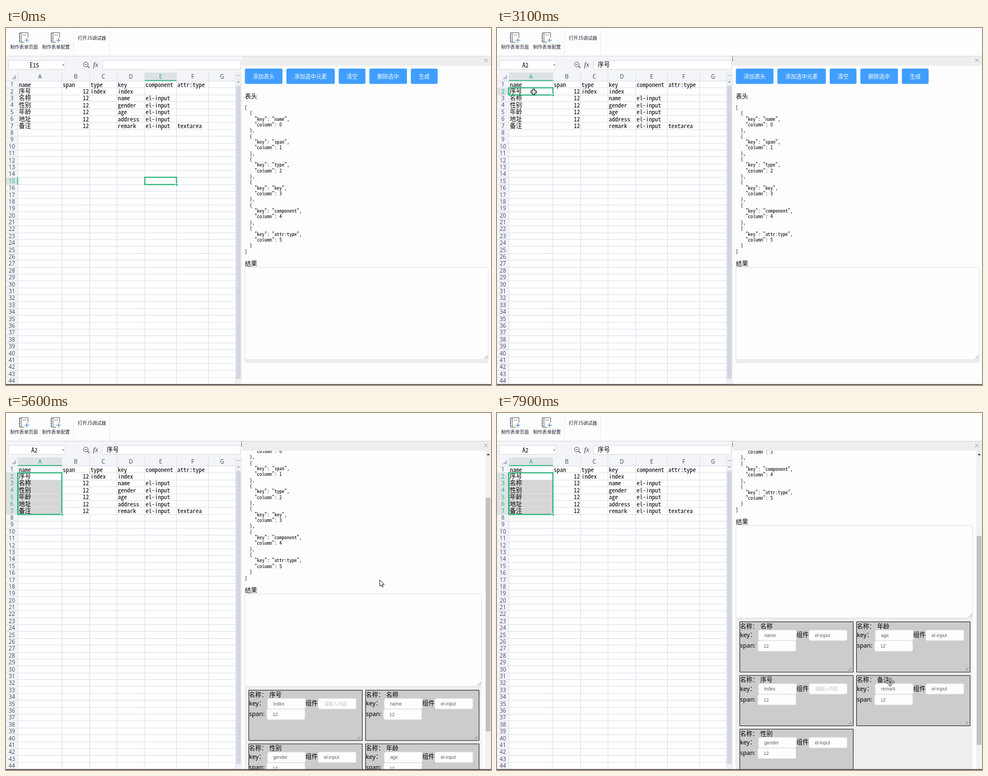
Recreate the animation shown at these times as an HTML page with a canvas. Size 872 by 642 pixels, loop 8 s.

```html
<!DOCTYPE html>
<html lang="zh">
<head>
<meta charset="utf-8">
<style>
html, body { margin: 0; width: 100%; height: 100%; overflow: hidden; background: #fdfdfd; }
canvas { display: block; }
</style>
</head>
<body>
<canvas id="stage" width="872" height="642"></canvas>
<script>
const ctx = document.getElementById('stage').getContext('2d');
const SANS = '"Noto Sans", "Noto Sans CJK SC", sans-serif';
const CJK = '"Noto Sans CJK SC", "Noto Sans", sans-serif';
const MONO = '"Noto Sans Mono CJK SC", "Liberation Mono", monospace';
const ARIAL = '"Liberation Sans", "Noto Sans CJK SC", sans-serif';
const SERIF = '"Liberation Serif", serif';
const GREEN = '#21b072', BLUE = '#409eff', HOVER = '#66b1ff', PRESS = '#3a8ee6';

ctx.font = `100px ${MONO}`;
const MONO_WIDTH = ctx.measureText('0').width / 100;

const COLS = [21.5, 100.5, 150.5, 199.5, 249.5, 306.5, 364.5, 412.5];
const ROWS = [
  ['name', 'span', 'type', 'key', 'component', 'attr:type'],
  ['序号', '12', 'index', 'index'],
  ['名称', '12', '', 'name', 'el-input'],
  ['性别', '12', '', 'gender', 'el-input'],
  ['年龄', '12', '', 'age', 'el-input'],
  ['地址', '12', '', 'address', 'el-input'],
  ['备注', '12', '', 'remark', 'el-input', 'textarea']
];
const JSON_LINES = JSON.stringify(
  ROWS[0].map((key, column) => ({ key, column })), null, 2).split('\n');

let nextX = 429.5;
const BUTTONS = ['添加表头', '添加选中元素', '清空', '删除选中', '生成'].map(label => {
  const x = nextX, w = 28.6 + 9.75 * label.length;
  nextX += w + 7;
  return { label, x, w };
});

// Pointer moves: from time, to time, x, y
const MOVES = [
  [0, 100, 843, 139], [100, 450, 430, 45], [450, 900, 88, 101], [900, 1000, 62, 103],
  [1000, 1570, 360, 104], [1800, 2200, 463, 87], [2500, 3000, 66, 115],
  [3100, 3500, 66, 176], [3700, 4300, 608, 108], [4300, 4500, 552, 86],
  [4900, 5300, 672, 300], [6000, 6500, 739, 442], [6600, 7150, 524, 437],
  [7400, 7900, 707, 484]
];

const clamp = p => Math.min(1, Math.max(0, p));
const mix = (a, b, p) => a + (b - a) * p;
const easeOut = (start, t) => 1 - (1 - clamp((t - start) / 200)) ** 3;
const rowY = r => 96 + 12.39 * r;
const rowLine = r => Math.round(rowY(r)) - 0.5;

function ramp(from, to, t) {
  const p = clamp((t - from) / (to - from));
  return p * p * (3 - 2 * p);
}

function cursorAt(t) {
  let x = 0, y = 0;
  for (const [from, to, toX, toY] of MOVES) {
    const p = ramp(from, to, t);
    x = mix(x, toX, p);
    y = mix(y, toY, p);
  }
  return [x, y];
}

// The selected range trails the dragging pointer
function selection(t) {
  if (t < 1000) return [4, 14, 4, 14];
  const [press, row] = t < 3000 ? [1000, 0] : [3000, 1];
  const [x, y] = cursorAt(Math.min(press + 700, Math.max(press, t - 200)));
  return [0, row, COLS.findIndex(c => c > x) - 1, Math.floor((y - rowY(0)) / 12.39)];
}

function box(x, y, w, h, fill, stroke, r = 0, width = 1) {
  ctx.beginPath();
  ctx.roundRect(x, y, w, h, r);
  if (fill) { ctx.fillStyle = fill; ctx.fill(); }
  if (stroke) { ctx.strokeStyle = stroke; ctx.lineWidth = width; ctx.stroke(); }
}

function line(x1, y1, x2, y2, color, width = 1) {
  ctx.beginPath();
  ctx.moveTo(x1, y1);
  ctx.lineTo(x2, y2);
  ctx.strokeStyle = color;
  ctx.lineWidth = width;
  ctx.stroke();
}

function poly(points, fill, stroke) {
  ctx.beginPath();
  points.forEach(([x, y]) => ctx.lineTo(x, y));
  ctx.closePath();
  ctx.fillStyle = fill;
  ctx.fill();
  if (stroke) { ctx.strokeStyle = stroke; ctx.lineWidth = 1; ctx.stroke(); }
}

function triangle(x, y, w, h, color) {
  poly([[x - w / 2, y], [x + w / 2, y], [x, y + h]], color);
}

function text(s, x, y, size, font, color = '#000', align = 'left', style = '') {
  ctx.font = `${style} ${size}px ${font}`;
  ctx.fillStyle = color;
  ctx.textAlign = align;
  ctx.fillText(s, x, y);
}

function mono(s, x, y, advance, align) {
  if (s > '\u2fff') text(s, x, y, 2 * advance, CJK, '#000', align);
  else text(s, x, y, advance / MONO_WIDTH, MONO, '#000', align);
}

function grip(x, y) {
  for (const d of [3, 6]) line(x - d, y, x, y - d, '#777', 0.8);
}

function notebook(x) {
  box(x + 0.5, 8.5, 15, 17, '#fff', '#666');
  line(x + 3.5, 9, x + 3.5, 25, '#666');
  line(x + 6, 12.5, x + 13, 12.5, '#888');
  for (let y = 11; y < 25; y += 4) line(x - 1, y, x + 2, y, '#666');
  box(x + 9, 17, 9, 10, '#fdfdfd');
  line(x + 13.5, 18, x + 13.5, 26, '#4a90e2', 1.2);
  line(x + 9.5, 22, x + 17.5, 22, '#4a90e2', 1.2);
}

function toolbar() {
  box(0, 0, 872, 50, '#fdfdfd');
  ['制作表单页面', '制作表单配置', '打开JS调试器'].forEach((label, i) => {
    if (i < 2) notebook(24 + 57 * i);
    text(label, [7.5, 65, 129][i], i < 2 ? 37 : 20.5, 8.3, CJK, '#223');
  });
  for (const x of [121.5, 186.5]) line(x, 4, x, 47, '#ececec');
  line(0, 50.5, 872, 50.5, '#d9d9d9');
}

function formulaBar([col, row]) {
  box(0, 51, 423, 29, '#f4f5f8');
  box(4.5, 58.5, 102, 16, '#fff', '#d9dce2');
  box(173.5, 58.5, 248, 16, '#fff', '#d9dce2');
  mono('ABCDEFG'[col] + (row + 1), 51, 70.5, 5.5, 'center');
  triangle(103, 65.5, 4, 2.5, '#777');
  box(139.3, 61.3, 8.4, 8.4, null, '#556', 4.2);
  line(146.5, 68.5, 150, 72, '#556', 1.4);
  line(141.5, 65.5, 145.5, 65.5, '#556');
  text('fx', 156.5, 70, 13, SERIF, '#445', 'left', 'italic');
  mono(ROWS[row]?.[col] || '', 181, 69.5, 5.5);
}

function sheet([c0, r0, c1, r1]) {
  box(0, 80, 413, 562, '#fff');
  box(0, 80, 413, 15, '#f3f5f9');
  box(0, 95, 21, 547, '#f3f5f9');
  poly([[18, 84], [18, 92], [10, 92]], '#b9bec8');

  const x = COLS[c0], y = rowLine(r0), w = COLS[c1 + 1] - x, h = rowLine(r1 + 1) - y;
  if (c1 > c0 || r1 > r0) {
    box(x, y, w, h, '#d6d6d6');
    box(x, y, COLS[c0 + 1] - x, rowLine(r0 + 1) - y, '#fff');
  }
  box(x, 80, w, 15, '#dde3e5');
  box(0, y, 21, h, '#dde3e5');

  for (const cx of COLS) line(cx, 80, cx, 642, '#dbe0ec');
  for (let r = 0; r < 45; r++) line(0, rowLine(r), 412, rowLine(r), '#dbe0ec');
  const label = (s, lx, ly, on) =>
    text(s, lx, ly, 10, SANS, on ? GREEN : '#4a5260', 'center');
  for (let c = 0; c < 7; c++) {
    label('ABCDEFG'[c], (COLS[c] + COLS[c + 1]) / 2, 91, c >= c0 && c <= c1);
  }
  for (let r = 0; r < 44; r++) label(r + 1, 10.5, rowY(r) + 9.3, r >= r0 && r <= r1);

  ROWS.forEach((row, r) => row.forEach((s, c) => {
    const right = c === 1 && r > 0;
    mono(s, right ? COLS[2] - 1.5 : COLS[c] + 1.5, rowY(r) + 9.7, 5.5, right ? 'right' : 'left');
  }));

  line(x, 94.5, x + w, 94.5, GREEN, 1.5);
  line(21, y, 21, y + h, GREEN, 1.5);
  box(x, y, w, h, null, GREEN, 0, 2);
  box(x + w - 1.5, y + h - 1.5, 4, 4, GREEN, '#fff');

  box(413, 80, 11, 562, '#eef0f4');
  line(415, 85.5, 422, 85.5, '#b5b9c2');
  triangle(418, 98, 5, -3, '#9aa0ab');
  box(414, 104, 8, 527, '#d3d7de', null, 2);
}

function field(s, x, y) {
  box(x, y, 68.5, 19, '#fdfdfd', '#dcdfe6', 2.7);
  text(s || '请输入内容', x + 10.5, y + 12.6, 8.3, ARIAL, s ? '#606266' : '#c0c4cc');
}

function card([name, span, , key, component], x, y) {
  box(x, y, 204, 90.5, '#ccc', '#222');
  text('名称：', x + 0.5, y + 12.3, 11, CJK);
  text(name, x + 37, y + 12.3, 11, CJK);
  text('key：', x + 0.5, y + 27.5, 11, SANS);
  field(key, x + 33.5, y + 14.7);
  text('组件', x + 102, y + 27.5, 11, CJK);
  field(component, x + 124.5, y + 14.7);
  text('span:', x + 0.5, y + 46.5, 11, SANS);
  field(span, x + 32.5, y + 34);
  grip(x + 201, y + 88);
}

function cards(t, scroll) {
  const down = easeOut(6800, t), up = easeOut(7200, t);
  const left = 436.5, right = 646.5;
  const slotY = r => 603.5 + 96.5 * r - scroll;
  ROWS.slice(1).forEach((row, i) => {
    if (i === 1) return;
    if (i % 2) card(row, right, slotY((i >> 1) - up));
    else card(row, left, slotY((i >> 1) + down));
  });

  // The dragged card trails the pointer, then settles in its new slot
  let x = right, y = slotY(0);
  if (t >= 6600) {
    const [grabX, grabY] = cursorAt(6600), [cx, cy] = cursorAt(Math.min(t, 7400) - 50);
    const settle = easeOut(7400, t);
    x = mix(x + cx - grabX, left, settle);
    y = mix(y + cy - grabY, y, settle);
    const step = 17.5, snapped = left + Math.max(0, Math.round((x - left) / step)) * step;
    if (t <= 7400) box(snapped, slotY(0), 204, 90.5, 'rgba(255,0,0,.2)');
  }
  card(ROWS[2], x, y);
}

function buttonColor(i, t) {
  if (i === 0 && t >= 2100 && t < 2700) return t >= 2400 && t < 2600 ? PRESS : HOVER;
  if (i === 1 && t >= 4500) return t >= 4700 && t < 4900 ? PRESS : HOVER;
  return BLUE;
}

function panel(t) {
  const filled = t >= 4900, scroll = 228 * ramp(5240, 6000, t);
  const right = filled ? 855 : 867;
  box(424, 51, 448, 17, '#eee');
  line(859.5, 55, 866, 61.5, '#999');
  line(866, 55, 859.5, 61.5, '#999');

  ctx.save();
  ctx.beginPath();
  ctx.rect(424, 68, 448, 574);
  ctx.clip();
  box(424, 68, 448, 574, '#fdfdfd');
  ctx.translate(0, -scroll);
  BUTTONS.forEach(({ label, x, w }, i) => {
    box(x, 73, w, 27.5, buttonColor(i, t), null, 2.5);
    text(label, x + w / 2, 90.6, 9.75, CJK, '#fff', 'center');
  });
  text('表头', 429.5, 126.8, 11, CJK);
  JSON_LINES.forEach((s, i) => mono(s, 429, 145.8 + 10.35 * i, 4.47));
  text('结果', 429.5, 427.8, 11, CJK);
  box(429, 596, right - 429, filled ? 400 : 7, '#eee');
  box(429.5, 430.5, right - 429.5, 166, '#fefefe', '#dcdfe6', 2.7);
  grip(right - 1, 595);
  ctx.translate(0, scroll);

  if (filled) {
    cards(t, scroll);
    const ratio = t < 6800 ? 0.696 : 0.622;
    box(861.5, 68, 10.5, 574, '#f1f1f1');
    triangle(867, 76, 6, -3.5, '#505050');
    box(862.5, 79.2 + scroll * ratio, 8.5, 604 * ratio, '#c1c1c1');
  }
  ctx.restore();
}

function spin(draw) {
  for (let i = 0; i < 4; i++) {
    draw();
    ctx.rotate(Math.PI / 2);
  }
}

const POINTERS = {
  arrow() {
    poly([[0, 0], [0, 11.5], [2.6, 9], [4.5, 13], [6.3, 12.2], [4.5, 8.3], [8, 8.3]], '#fff', '#222');
  },
  plus() {
    spin(() => line(0, 0, 0, 5.5, '#000', 4.6));
    spin(() => line(0, 0, 0, 4.5, '#fff', 2.4));
  },
  hand() {
    box(-4, 5, 10, 8.5, '#fff', '#222', 3);
    box(-1.5, 0, 2.6, 9, '#fff', '#222', 1.3);
  },
  move() {
    spin(() => {
      line(0, 0, 0, 6, '#333', 3);
      triangle(0, 4.5, 7, 4, '#333');
    });
    spin(() => {
      line(0, 1, 0, 5, '#fff', 1.2);
      triangle(0, 5.2, 4, 2, '#fff');
    });
  }
};

function cursor(t) {
  if (t < 100) return;
  const [x, y] = cursorAt(t);
  const onButton = t < 5000 && y > 73 && y < 100 && BUTTONS.some(b => x > b.x && x < b.x + b.w);
  let kind = 'arrow';
  if (x < 412 && y > 95) kind = 'plus';
  else if (onButton) kind = 'hand';
  else if (t > 6000 && y > 375) kind = 'move';
  ctx.save();
  ctx.translate(x, y);
  POINTERS[kind]();
  ctx.restore();
}

function draw(now) {
  const t = Math.floor(now % 8000 / 100) * 100;
  const range = selection(t);
  toolbar();
  formulaBar(range);
  sheet(range);
  panel(t);
  box(0, 640.5, 872, 1.5, '#3c3f44');
  cursor(t);
}

const start = performance.now();
function loop() {
  draw(performance.now() - start);
  requestAnimationFrame(loop);
}
loop();
</script>
</body>
</html>
```
